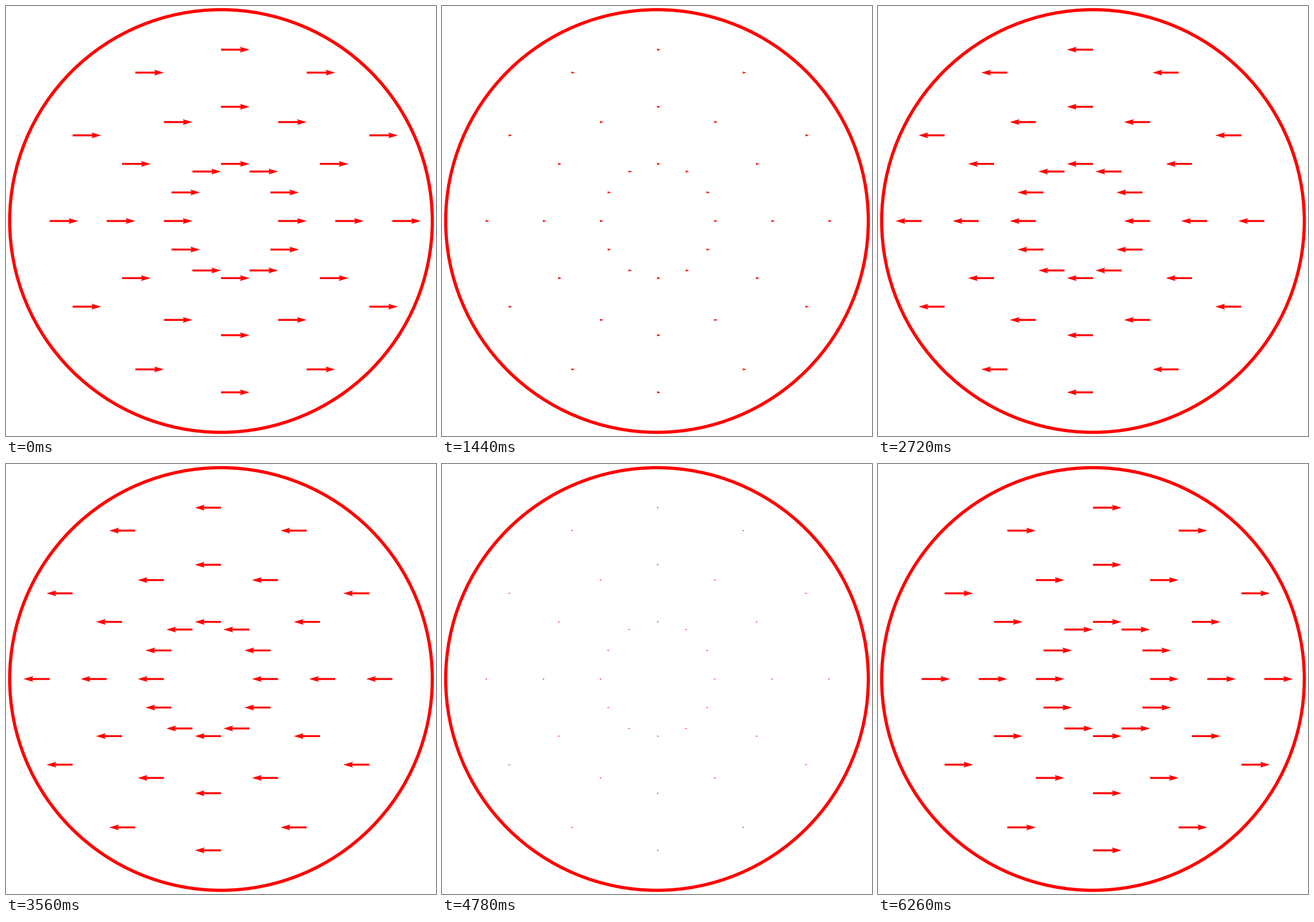
A matplotlib script for the animation above (6280 ms loop, 748 by 748 pixels).

```python
import numpy as np
import matplotlib.pyplot as plt
from matplotlib.animation import FuncAnimation

SIZE, DPI = 748, 100
FRAMES, STEP = 314, 20          # 6280 ms loop
UNIT = 99.35                    # pixels per unit of radius
AMP = UNIT / 2                  # longest arrow

fig = plt.figure(figsize=(SIZE / DPI, SIZE / DPI), dpi=DPI, facecolor="white")
ax = fig.add_axes([0, 0, 1, 1])
ax.set_xlim(-SIZE / 2, SIZE / 2)
ax.set_ylim(-SIZE / 2, SIZE / 2)
ax.axis("off")

ax.add_patch(plt.Circle((0, 0), 3.7 * UNIT, fill=False, ec="red", lw=4))

# Three rings of twelve arrows
radius, angle = np.meshgrid(UNIT * np.arange(1, 4), np.arange(12) * np.pi / 6)
x = (radius * np.cos(angle)).ravel()
y = (radius * np.sin(angle)).ravel()
zero = np.zeros_like(x)

arrows = ax.quiver(x, y, zero + AMP, zero, color="red", units="dots",
                   width=3.35, scale_units="dots", scale=1)


def update(i):
    arrows.set_UVC(zero + AMP * np.cos(i * STEP / 1000), zero)
    return [arrows]


anim = FuncAnimation(fig, update, frames=FRAMES, interval=STEP,
                     repeat=True, repeat_delay=0, blit=False)
plt.show()
```
